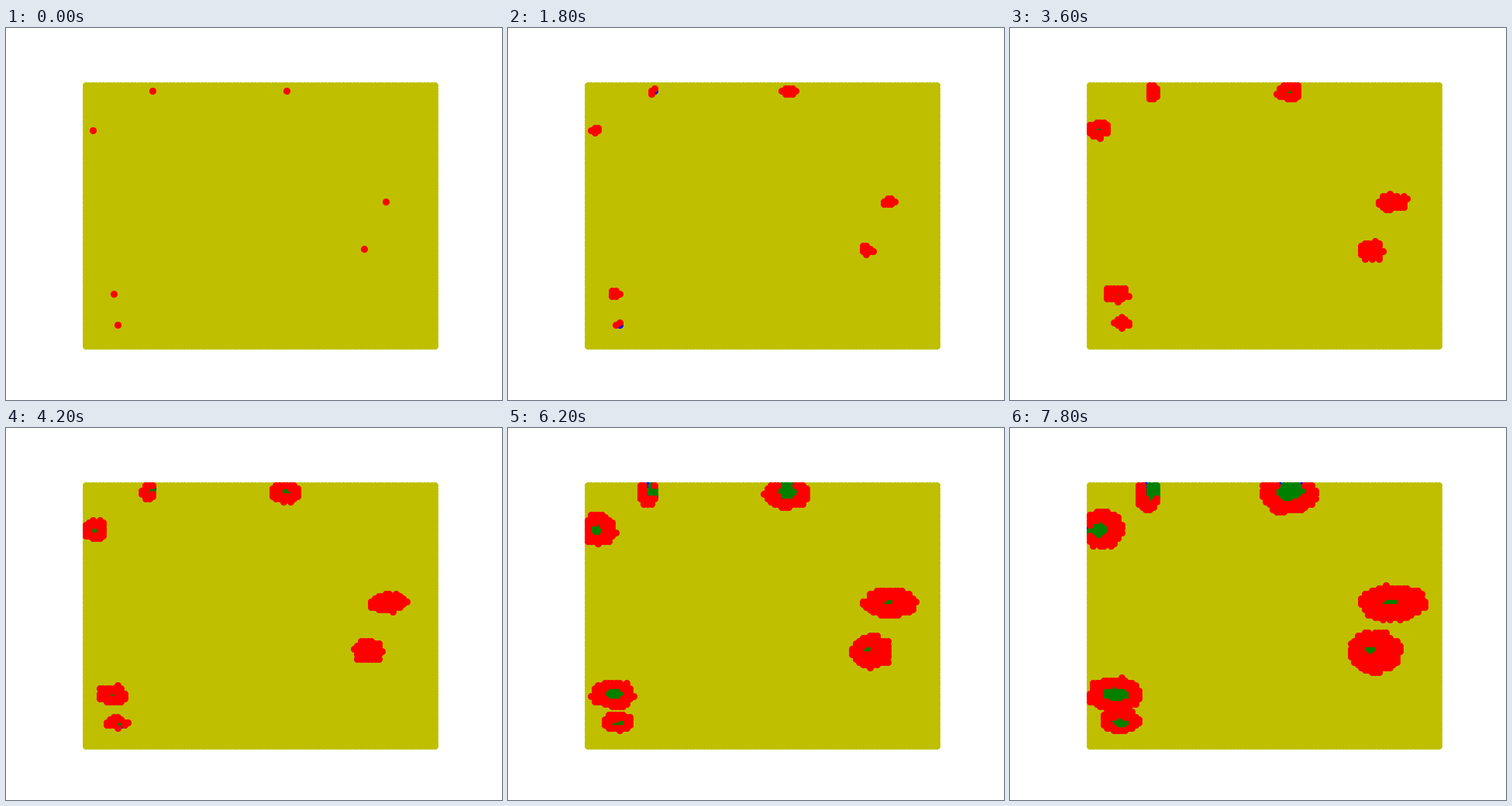
Recreate the animation shown at these times as an HTML page with a canvas. Size 640x480 px, loop 8000 ms.

```html
<!DOCTYPE html>
<html lang="en">
<head>
<meta charset="utf-8">
<title>Epidemic on a grid</title>
<style>
html, body { margin: 0; width: 100%; height: 100%; overflow: hidden; background: #fff; }
canvas { display: block; }
</style>
</head>
<body>
<canvas id="stage" width="640" height="480"></canvas>
<script>
const WIDTH = 640, HEIGHT = 480, SIZE = 100, RADIUS = 4.6;
const STEP = 200, STEPS = 40, LAST = STEPS - 1;
const FIRST_HEAL = 8, BLUE_STEPS = 3, MIN_SICK = 6;
const YELLOW = '#bfbf00', RED = '#f00', BLUE = '#00f', GREEN = '#008000';

const colX = col => Math.round(102.545 + col * 4.5546) + 0.5;
const rowY = row => Math.round(74.4 + row * 3.3939) + 0.5;

let state = 7;
function random() {
  state = (state * 16807) % 2147483647;
  return state / 2147483647;
}
const jitter = range => (random() - 0.5) * range;

// Starts at one cell, fills an ellipse by the last step; core is the share healed by then
const outbreak = (col, row, cx, cy, rx, ry, core) =>
  ({ x: colX(col), y: rowY(row), cx, cy, rx, ry, core });

const outbreaks = [
  outbreak(57, 2, 360, 84, 36, 25, 0.55),
  outbreak(2, 17, 118, 130, 27, 24, 0.5),
  outbreak(19, 2, 178, 82, 15, 24, 0.6),
  outbreak(85, 44, 494, 226, 43, 22, 0.28),
  outbreak(79, 62, 471, 289, 33, 26, 0.28),
  outbreak(8, 79, 135, 344, 35, 21, 0.55),
  outbreak(9, 91, 142, 378, 25, 14, 0.55)
];

// Distance from the start as a share of the way to the ellipse
function reach(x, y, o) {
  const dx = (x - o.x) / o.rx, dy = (y - o.y) / o.ry;
  const ox = (o.x - o.cx) / o.rx, oy = (o.y - o.cy) / o.ry;
  const dot = ox * dx + oy * dy, len = dx * dx + dy * dy;
  return len && len / (Math.sqrt(dot * dot + len * (1 - ox * ox - oy * oy)) - dot);
}

function infect(x, y, o) {
  const share = reach(x, y, o);
  const sick = share && Math.max(1, LAST * share + jitter(6));
  const spread = (LAST - FIRST_HEAL) * share / o.core;
  const healing = share ? Math.max(sick + MIN_SICK, FIRST_HEAL + spread + jitter(5)) : FIRST_HEAL;
  return { x, y, sick, healing, healed: healing + BLUE_STEPS };
}

function dots(ctx, list, color) {
  ctx.fillStyle = color;
  ctx.beginPath();
  for (const { x, y } of list) {
    ctx.moveTo(x + RADIUS, y);
    ctx.arc(x, y, RADIUS, 0, 2 * Math.PI);
  }
  ctx.fill();
}

const cells = [];
for (let row = 0; row < SIZE; row++) {
  for (let col = 0; col < SIZE; col++) {
    const options = outbreaks.map(o => infect(colX(col), rowY(row), o));
    cells.push(options.reduce((a, b) => a.sick <= b.sick ? a : b));
  }
}
const victims = cells.filter(c => c.sick <= LAST);

const ctx = document.getElementById('stage').getContext('2d');
const field = document.createElement('canvas');
field.width = WIDTH;
field.height = HEIGHT;
dots(field.getContext('2d'), cells, YELLOW);

function draw(step) {
  ctx.fillStyle = '#fff';
  ctx.fillRect(0, 0, WIDTH, HEIGHT);
  ctx.drawImage(field, 0, 0);
  dots(ctx, victims.filter(c => step >= c.healing && step < c.healed), BLUE);
  dots(ctx, victims.filter(c => step >= c.healed), GREEN);
  dots(ctx, victims.filter(c => step >= c.sick && step < c.healing), RED);
}

const start = performance.now();
let shown = -1;
function tick() {
  const step = Math.floor((performance.now() - start) / STEP) % STEPS;
  if (step !== shown) draw(shown = step);
  requestAnimationFrame(tick);
}
tick();
</script>
</body>
</html>
```
